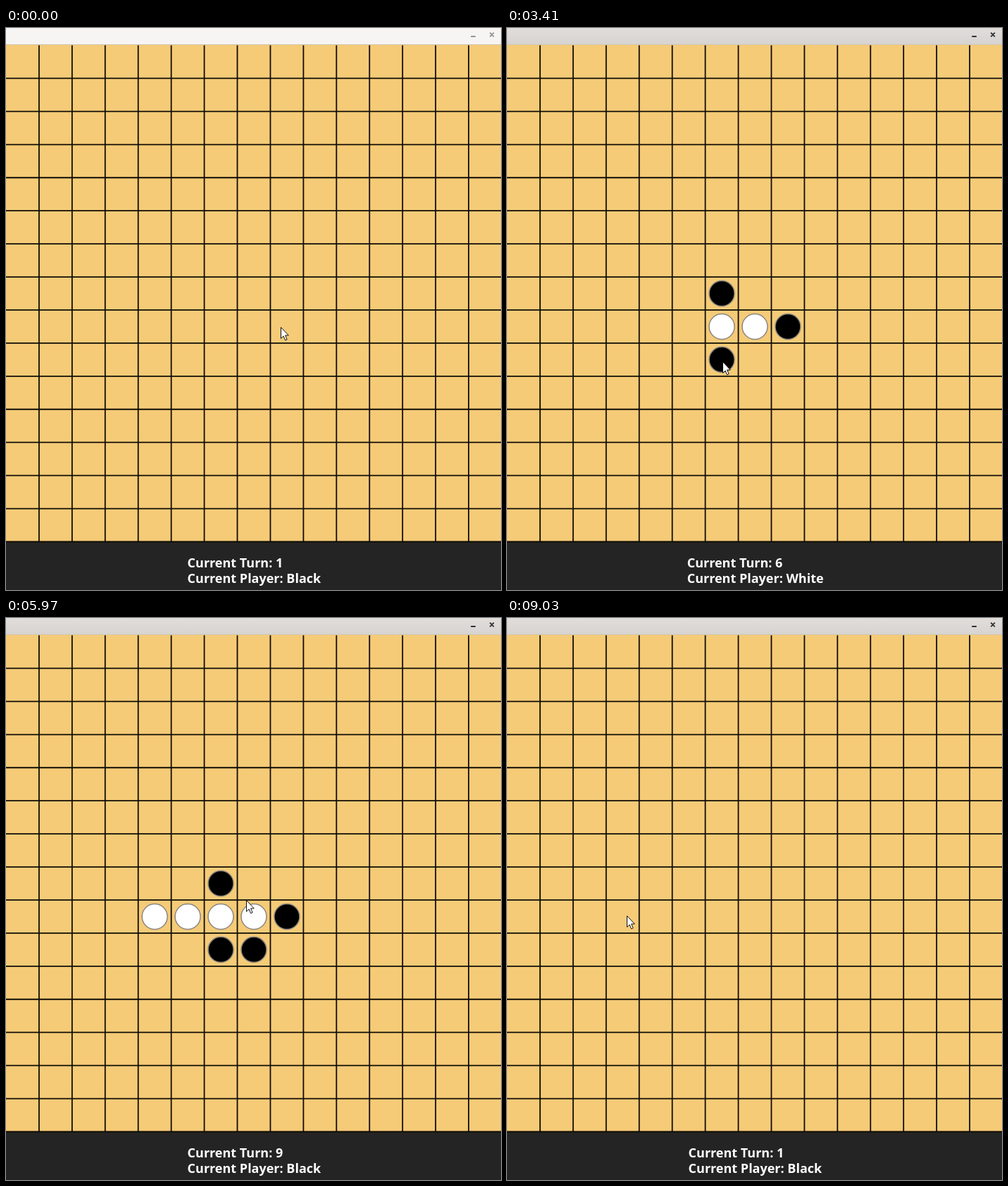
These frames come from a looping animation (703x797 px, 9160 ms). An HTML page:

```html
<!DOCTYPE html>
<html lang="en">
<head>
<meta charset="utf-8">
<title>Board game</title>
<style>
  html, body { margin: 0; width: 100%; height: 100%; overflow: hidden; background: #242424; }
  svg { display: block; width: 703px; height: 797px; }
  text { font: bold 18px "Noto Sans", "Open Sans", sans-serif; fill: #fff; }
</style>
</head>
<body>
<svg viewBox="0 0 703 797">
  <defs>
    <linearGradient id="bar" x2="0" y2="1">
      <stop offset="0" stop-color="#e1dddb"/>
      <stop offset="1" stop-color="#d7d3d0"/>
    </linearGradient>
  </defs>
  <rect width="703" height="797" fill="#242424"/>
  <rect y="24" width="703" height="704" fill="#f5cb77"/>
  <path id="grid" stroke="#100c06" stroke-width="1.8" fill="none"/>
  <rect id="title" width="703" height="24"/>
  <path d="M0 23.5H703" stroke="#d0c7b8"/>
  <path id="buttons" d="M660.2 12h6.6M687.2 6.7l5.6 5.6m0-5.6l-5.6 5.6" stroke-width="1.9" fill="none"/>
  <g id="stones" stroke="#8d8780" stroke-width="1.5"></g>
  <text id="turn" y="765"></text>
  <text id="player" y="787"></text>
  <path id="cursor" d="M.5 .5V16.3L4.1 12.9 6.6 18.8 9.1 17.7 6.6 11.9H11.3Z" fill="#fff" stroke="#111"/>
  <circle id="press" r="14.5" fill="#fff000" fill-opacity=".6"/>
</svg>
<script>
const LOOP = 9160, RESET = 8960, PRESS = 70;
const SIZE = 15, CELL = 704 / SIZE, TOP = 24.5;
const $ = id => document.getElementById(id);

// The pointer glides to (x, y), arrives at time t, and may press there.
const rest = (t, x, y, glide) => ({ t, x, y, glide });
const press = (t, x, y, glide) => ({ t, x, y, glide, pressed: true });
const stops = [
  press(70, 390, 424, 0),
  press(460, 333, 415, 320),
  press(1330, 300, 379, 400),
  press(1940, 295, 442, 350),
  rest(2540, 277, 466, 270),
  press(2950, 306, 473, 270),
  press(4230, 253, 427, 820),
  press(4570, 350, 452, 220),
  press(5140, 210, 418, 300),
  rest(5720, 321, 378, 450),
  press(6700, 388, 454, 920),
  rest(7550, 170, 422, 710),
  press(7880, 170, 422, 0)
];
const moves = stops.filter(stop => stop.pressed);

for (let k = 1, d = ""; k <= SIZE; k++) {
  d += `M0 ${TOP + k * CELL}H703`;
  if (k < SIZE) d += `M${k * CELL} ${TOP}V728`;
  $("grid").setAttribute("d", d);
}

// Each press puts a stone in the cell under the pointer, black and white in turn.
const middle = v => (Math.floor(v / CELL) + .5) * CELL;
const stones = moves.map(({ x, y }, i) => {
  const stone = document.createElementNS("http://www.w3.org/2000/svg", "circle");
  const attrs = { cx: middle(x), cy: TOP + middle(y - TOP), r: 18, fill: i % 2 ? "#fff" : "#000" };
  for (const name in attrs) stone.setAttribute(name, attrs[name]);
  return $("stones").appendChild(stone);
});

const easeOut = u => 1 - (1 - u) ** 1.5;

function pointerAt(t) {
  const i = stops.findIndex(stop => stop.t > t);
  const to = stops.at(i), from = stops[i - 1] || to;
  const u = to.glide ? Math.min(1, Math.max(0, 1 - (to.t - t) / to.glide)) : 1;
  const mix = axis => Math.round(from[axis] + (to[axis] - from[axis]) * easeOut(u));
  return [mix("x"), mix("y")];
}

function render(t) {
  const played = t < RESET ? moves.filter(move => move.t <= t).length : 0;
  stones.forEach((stone, i) => stone.setAttribute("visibility", i < played ? "visible" : "hidden"));

  // The winning move leaves the status text unchanged.
  const turn = Math.min(played + 1, moves.length);
  const white = turn % 2 === 0;
  $("turn").textContent = `Current Turn: ${turn}`;
  $("player").textContent = `Current Player: ${white ? "White" : "Black"}`;
  for (const id of ["turn", "player"]) $(id).setAttribute("x", white ? 255.7 : 257.6);

  const focused = t >= moves[0].t;
  $("title").setAttribute("fill", focused ? "url(#bar)" : "#f6f5f3");
  $("buttons").setAttribute("stroke", focused ? "#2e3436" : "#929595");

  const place = `translate(${pointerAt(t)})`;
  const pressing = moves.some(move => t >= move.t && t < move.t + PRESS);
  $("cursor").setAttribute("transform", place);
  $("press").setAttribute("transform", place);
  $("press").setAttribute("visibility", pressing ? "visible" : "hidden");
}

const start = performance.now();
function tick(now) {
  render(Math.max(0, now - start) % LOOP);
  requestAnimationFrame(tick);
}
render(0);
requestAnimationFrame(tick);
</script>
</body>
</html>
```
